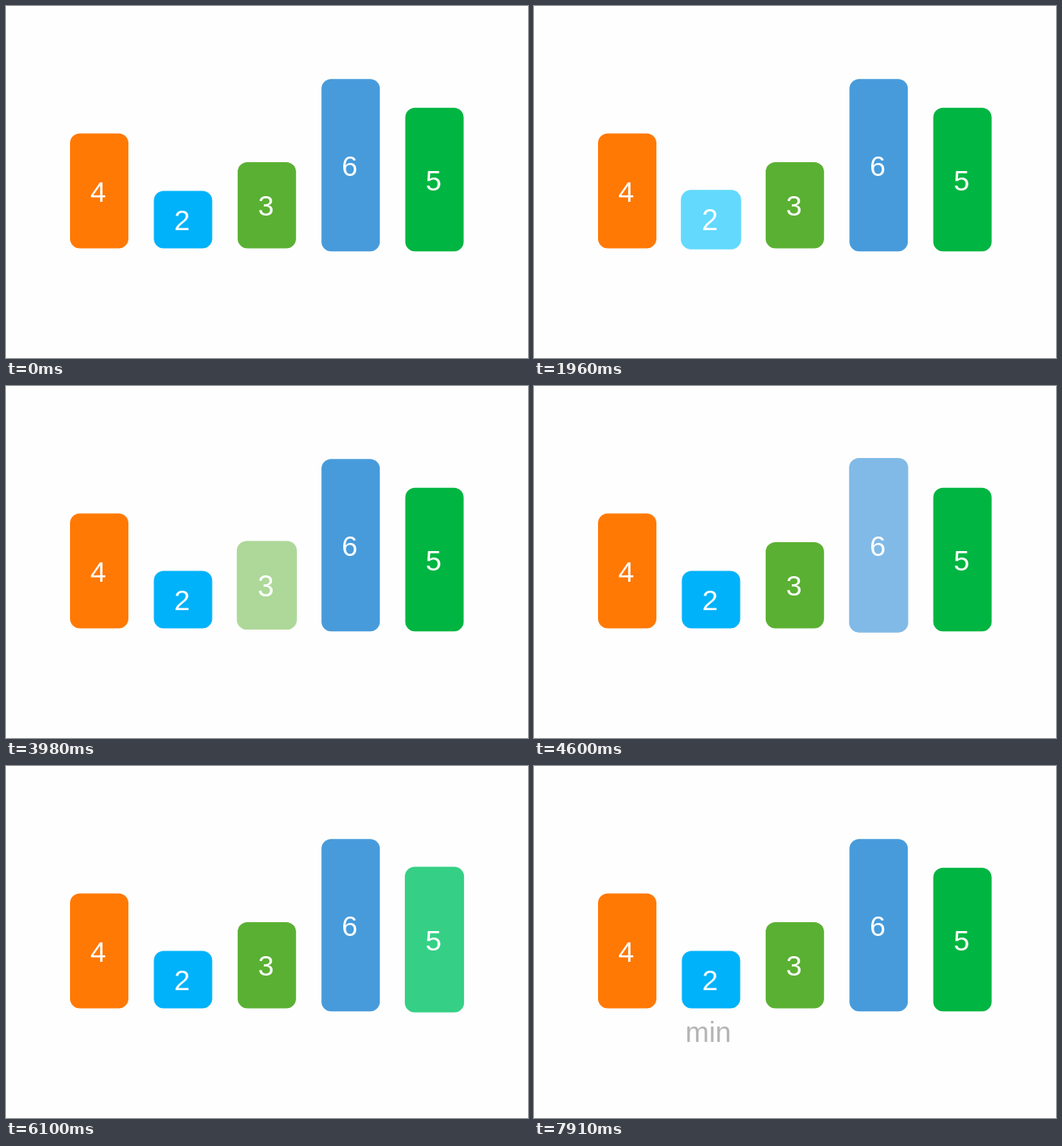
Write an HTML page that moves like this. It is 644 px wide and 435 px high and loops after 7.99 s.

```html
<!DOCTYPE html>
<html lang="en">
<head>
<meta charset="utf-8">
<title>Finding the minimum</title>
<style>
  html, body { margin: 0; width: 100%; height: 100%; overflow: hidden; background: #fefefe; }
  svg { display: block; }
  text { font: 35px "Liberation Sans", Arial, sans-serif; text-anchor: middle; }
</style>
</head>
<body>
<svg id="stage" width="644" height="435" viewBox="0 0 644 435">
  <text id="label" x="215" y="341" fill="#222">min</text>
</svg>
<script>
const LOOP = 7990, PULSE = 1472, GROWTH = 0.05;
const LABEL_START = 7420;
const LEFT = 79, STEP = 103.4, WIDTH = 72, UNIT = 35.5;

// A negative red keeps the bar saturated while it fades.
const colors = [[255, 121, 4], [-60, 178, 250], [90, 176, 50], [71, 155, 219], [-60, 181, 65]];

const bars = [4, 2, 3, 6, 5].map((value, i) => {
  const height = value * UNIT;
  const bottom = value > 4 ? 303.3 : 299.5;
  const group = add(stage, "g");
  const rect = add(group, "rect", { x: -WIDTH / 2, y: -height / 2, width: WIDTH, height, rx: 12 });
  add(group, "text", { x: -1.2, y: 13, fill: "#fff" }).textContent = value;
  return { group, rect, cx: LEFT + i * STEP + WIDTH / 2, cy: bottom - height / 2 };
});

function add(parent, tag, attrs = {}) {
  const el = document.createElementNS("http://www.w3.org/2000/svg", tag);
  for (const key in attrs) el.setAttribute(key, attrs[key]);
  return parent.appendChild(el);
}

const clamp = v => Math.max(0, Math.min(1, v));

function draw(now) {
  const t = now % LOOP;
  bars.forEach(({ group, rect, cx, cy }, i) => {
    const p = clamp(t / PULSE - i);
    const edge = Math.min(p, 1 - p);    // distance to the nearer end of the pulse
    const fade = clamp(edge / 0.2) / 2; // share of white, at most half
    const scale = 1 + GROWTH * 2 * edge;
    const rgb = colors[i].map(c => Math.max(0, Math.round(c + (255 - c) * fade)));
    rect.setAttribute("fill", `rgb(${rgb})`);
    group.setAttribute("transform", `translate(${cx} ${cy}) scale(${scale})`);
  });
  label.setAttribute("opacity", clamp((t - LABEL_START) / PULSE));
}

let start;
function tick(now) {
  start ??= now;
  draw(now - start);
  requestAnimationFrame(tick);
}
draw(0);
requestAnimationFrame(tick);
</script>
</body>
</html>
```
